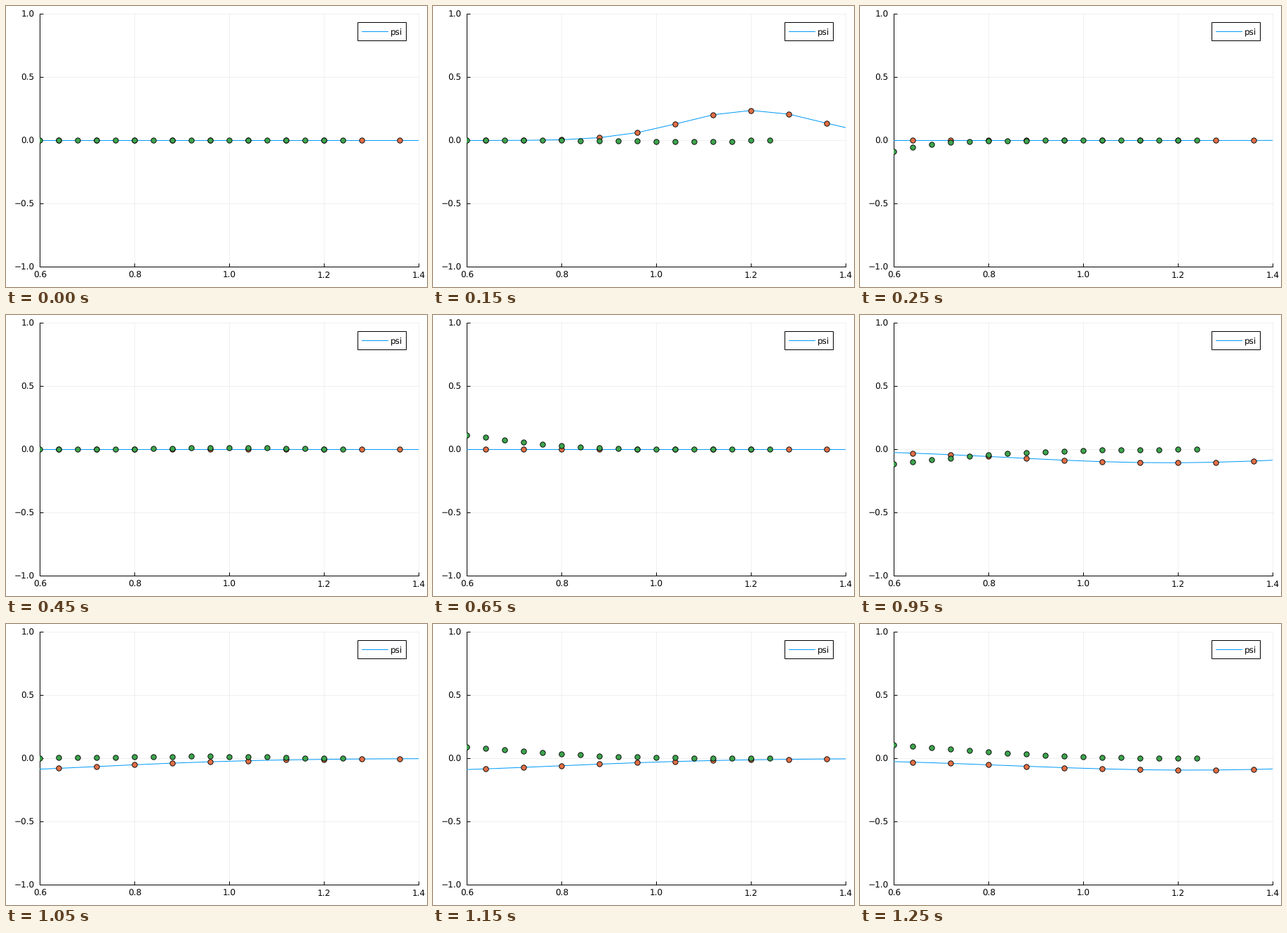
These frames come from a looping animation (600 by 400 pixels, 1300 ms). A matplotlib script:

```python
import numpy as np
import matplotlib.pyplot as plt
from matplotlib.animation import FuncAnimation
from matplotlib.patches import Rectangle

W, H, DPI = 600, 400, 100
FRAMES, INTERVAL = 26, 50
PX = 72 / DPI                      # one pixel in points
LEFT, RIGHT, TOP, BOTTOM = 48.4, 588.4, 11.45, 371.45
BLUE, RED, GREEN = "#009AF9", "#E26F46", "#3DA44D"

COARSE = np.arange(7, 19) * 0.08
FINE = np.arange(15, 32) * 0.04

plt.rcParams["text.hinting"] = "none"


def wave(x, t, wall, speed, spread):
    """Two half pulses leaving x = 0, flipped in sign at each wall."""
    width2 = 0.01 + spread * t
    amp = 0.05 / np.sqrt(width2)
    u = np.zeros_like(x)
    for k in range(-6, 7):
        for side in (-1, 1):
            d = x - 2 * k * wall - side * speed * t
            u += (-1) ** k * amp * np.exp(-d ** 2 / width2)
    return np.where(x < wall - 1e-9, u, 0)


def coarse_wave(t):
    return wave(COARSE, t, 4.4, 0.401, 0.0114)


def fine_wave(t):
    return wave(FINE, t, 1.2, 0.4012, 0.0057)


fig = plt.figure(figsize=(W / DPI, H / DPI), dpi=DPI, facecolor="white")
ax = fig.add_axes([LEFT / W, 1 - BOTTOM / H,
                   (RIGHT - LEFT) / W, (BOTTOM - TOP) / H])
ax.set(xlim=(0.6, 1.4), ylim=(-1, 1))
ax.spines[["top", "right"]].set_visible(False)
for side in ("left", "bottom"):
    ax.spines[side].set_linewidth(PX)

page = fig.add_axes([0, 0, 1, 1], zorder=5)
page.set(xlim=(0, W), ylim=(H, 0))
page.axis("off")


def label(x, y, text, ha):
    page.text(x, y, text, ha=ha, va="baseline", fontsize=12 * PX,
              family="DejaVu Sans", color="black")


xticks = np.linspace(0.6, 1.4, 5)
yticks = np.linspace(-1, 1, 5)
ax.set_xticks(xticks)
ax.set_yticks(yticks)
ax.tick_params(direction="in", length=5 * PX, width=PX,
               labelbottom=False, labelleft=False)

grid = dict(color="black", alpha=0.06, lw=PX, clip_on=False, zorder=0.5)
for v in xticks:
    ax.plot([v, v], [-1, 1], **grid)
    label(LEFT + (v - 0.6) / 0.8 * (RIGHT - LEFT), 387.3, f"{v:.1f}", "center")
for v in yticks:
    ax.plot([0.6, 1.4], [v, v], **grid)
    y = (TOP + BOTTOM) / 2 - v * (BOTTOM - TOP) / 2
    label(40.7, y + 4.4, f"{v:.1f}".replace("-", "\u2212"), "right")

page.add_patch(Rectangle((501.4, 23.4), 69, 26, fc="white", ec="black", lw=PX))
page.plot([507, 544], [36.4, 36.4], color=BLUE, lw=PX)
label(548, 40.9, "psi", "left")

dots = dict(ls="", marker="o", ms=7.4 * PX, mec="black", mew=0.9 * PX,
            snap=False)
line, = ax.plot(COARSE, 0 * COARSE, color=BLUE, lw=PX, snap=False, zorder=3)
coarse, = ax.plot(COARSE, 0 * COARSE, mfc=RED, zorder=4, **dots)
fine, = ax.plot(FINE, 0 * FINE, mfc=GREEN, zorder=5, **dots)


def update(t):
    psi = coarse_wave(t)
    line.set_ydata(psi)
    coarse.set_ydata(psi)
    fine.set_ydata(fine_wave(t))
    return line, coarse, fine


anim = FuncAnimation(fig, update, frames=FRAMES, interval=INTERVAL,
                     repeat=True, repeat_delay=0)
plt.show()
```
